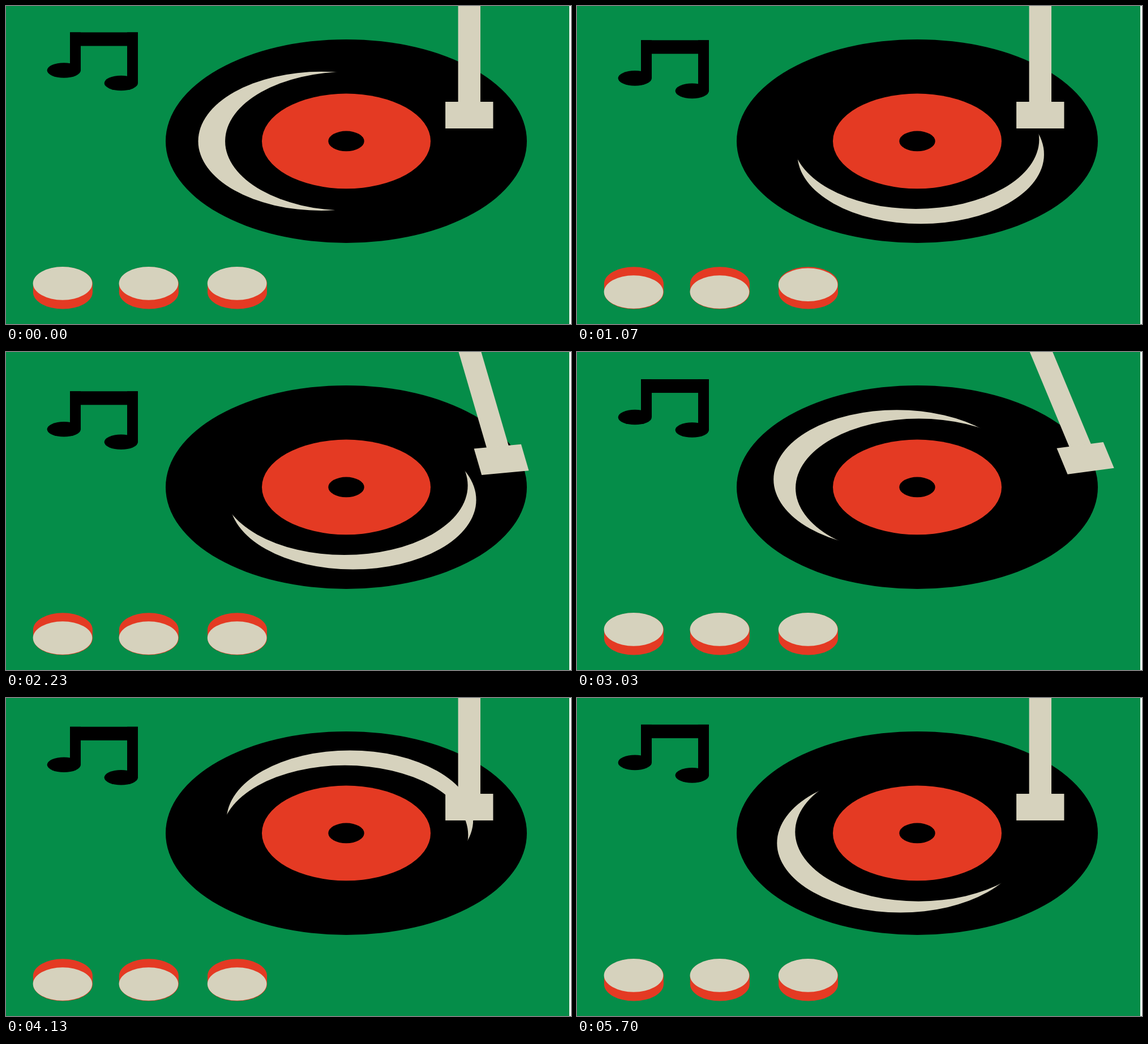
An HTML page with a canvas for the animation above (5730 ms loop, 998 px wide and 561 px high).

```html
<!DOCTYPE html>
<html lang="en">
<head>
<meta charset="utf-8">
<title>Turntable</title>
<style>
html, body { margin: 0; width: 100%; height: 100%; overflow: hidden; background: #fff; }
canvas { display: block; }
</style>
</head>
<body>
<canvas id="stage" width="998" height="561"></canvas>
<script>
const ctx = document.getElementById('stage').getContext('2d');
const GREEN = '#058d49', BLACK = '#000', CREAM = '#d6d2bd', RED = '#e43a23';
const LOOP = 5730, STEPS = 172, BEAT = 43;
const SQUASH = 0.5627; // the deck is seen at a slant
const RAD = Math.PI / 180;

const clamp = v => Math.min(1, Math.max(0, v));
const ease = (n, start, length) => {
  const u = clamp((n - start) / length);
  return u * u * (3 - 2 * u);
};

function oval(x, y, rx, ry, color) {
  ctx.fillStyle = color;
  ctx.beginPath();
  ctx.ellipse(x, y, rx, ry, 0, 0, 2 * Math.PI);
  ctx.fill();
}

function rect(x, y, w, h, color) {
  ctx.fillStyle = color;
  ctx.fillRect(x, y, w, h);
}

// Ten clockwise turns per loop at a slightly uneven pace: [step, degrees]
const spin = [[0, 0], [19, 358.4], [46, 907.3], [91, 1835.2], [124, 2620.8],
  [145, 3026.9], [171, 3552.3], [172, 3600]];
const slope = spin.slice(1).map(([n, a], i) => (a - spin[i][1]) / (n - spin[i][0]));
const tangent = spin.map((k, i) => {
  const a = slope[Math.max(0, i - 1)], b = slope[Math.min(slope.length - 1, i)];
  return 2 * a * b / (a + b);
});

function spinAngle(n) {
  const i = spin.findIndex((k, j) => n < spin[j + 1][0]);
  const [n0, a0] = spin[i], [n1, a1] = spin[i + 1];
  const h = n1 - n0, u = (n - n0) / h, v = 1 - u;
  return v * v * (1 + 2 * u) * a0 + u * u * (3 - 2 * u) * a1 +
    h * u * v * (v * tangent[i] - u * tangent[i + 1]);
}

function record(n) {
  const a = (180 + spinAngle(n)) * RAD;
  const disc = (x, r, color) => oval(x, 0, r, r, color);
  const shine = (shift, color) =>
    oval(shift * Math.cos(a) - 1.5, shift * Math.sin(a), 217.8, 217.8, color);
  ctx.save();
  ctx.translate(601, 238.4);
  ctx.scale(1, SQUASH);
  disc(0, 319, BLACK);
  shine(42.2, CREAM);
  shine(-5.4, BLACK);
  disc(0, 149, RED);
  disc(0, 31.7, BLACK);
  ctx.restore();
}

function arm(n) {
  const swing = ease(n, 58, 14) - ease(n, 98, 14);
  ctx.save();
  ctx.translate(818.3, -4);
  ctx.scale(1, SQUASH);
  ctx.rotate(-13.2 * RAD * swing);
  rect(-19.7, -60, 39.4, 400, CREAM);
  rect(-42.2, 307.4, 84.4, 83.6, CREAM);
  ctx.restore();
}

function note(n) {
  const bob = 11.6 * (1 - Math.cos(2 * Math.PI * (n - 1.2) / BEAT));
  ctx.save();
  ctx.translate(0, 46.3 + bob);
  rect(113, 0, 120, 24, BLACK);
  rect(113, 0, 19, 67, BLACK);
  rect(214, 0, 19, 90, BLACK);
  oval(102.3, 67, 29.7, 13.3, BLACK);
  oval(203.3, 89.5, 29.7, 13.3, BLACK);
  ctx.restore();
}

function button(x, i, n) {
  const m = n % (2 * BEAT);
  const press = ease(m, 6 + 12 * i, 8) - ease(m, 67, 8);
  oval(x + 0.4, 489.9, 52.5, 29.6, RED);
  rect(x - 52.1, 489.9, 105, 15.1, RED);
  oval(x + 0.4, 505, 52.5, 29.6, RED);
  oval(x, 489.4 + 15.1 * press, 52.3, 29.3, CREAM);
}

function draw(now) {
  const n = Math.min(STEPS - 1, Math.floor((now % LOOP + 9.9) * 0.03));
  rect(0, 0, 998, 561, '#fff');
  rect(0, 0, 995, 561, GREEN);
  record(n);
  arm(n);
  note(n);
  [100, 251.9, 408.1].forEach((x, i) => button(x, i, n));
}

const begin = performance.now();
function tick() {
  draw(performance.now() - begin);
  requestAnimationFrame(tick);
}
tick();
</script>
</body>
</html>
```
